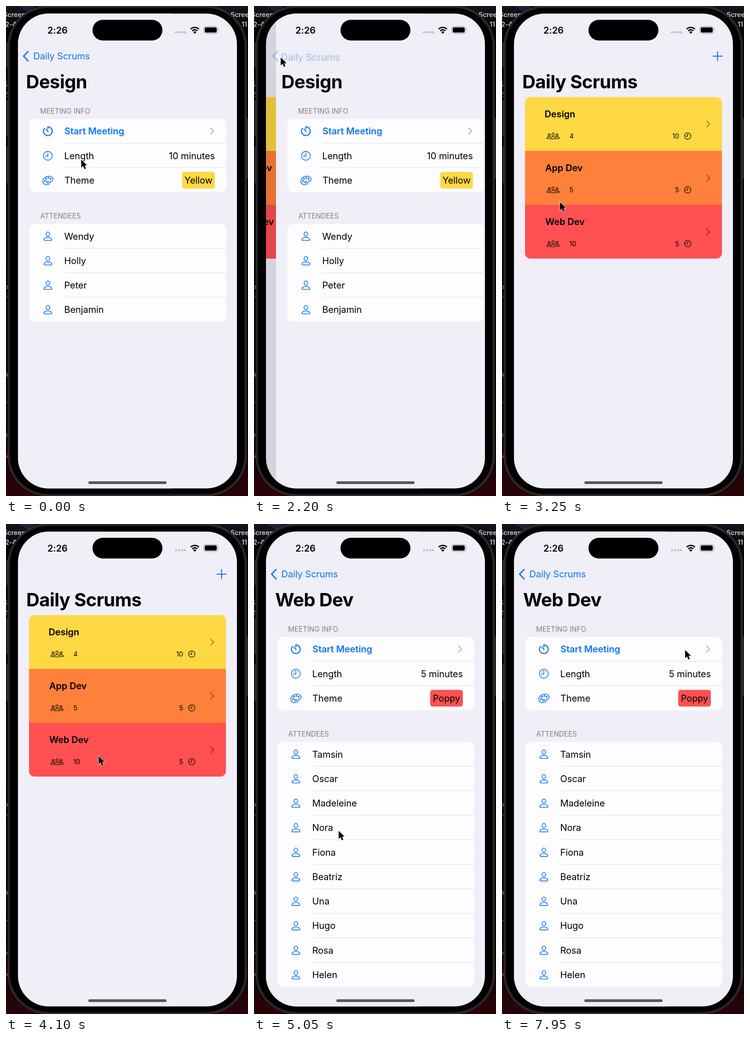
These frames come from a looping animation (526 by 1065 pixels, 8000 ms). An HTML page:

```html
<!DOCTYPE html>
<html lang="en">
<head>
<meta charset="utf-8">
<title>Daily Scrums</title>
<style>
@property --out { syntax: "<number>"; inherits: true; initial-value: 0; }
@property --in { syntax: "<number>"; inherits: true; initial-value: 0; }

html, body { margin: 0; width: 526px; height: 1065px; overflow: hidden; background: #000; }

svg {
  /* critically damped spring */
  --spring: linear(0, .0265 2.34%, .0902 4.68%, .2642 9.36%, .4422 14.04%, .594 18.73%,
    .7127 23.41%, .8009 28.09%, .8641 32.77%, .9084 37.45%, .9389 42.13%, .9596 46.8%,
    .9826 56.2%, .9927 65.5%, .997 74.9%, 1);
  /* 0 while a detail page is shown, 1 while the list is shown */
  --list: calc(var(--out) - var(--in));
  display: block;
  font: 20px Inter, "Liberation Sans", sans-serif;
  font-optical-sizing: none;
  letter-spacing: -.1px;
  animation: pop 8s infinite var(--spring), push 8s infinite var(--spring);
}
@keyframes pop { 0%, 27.284% { --out: 0; } 34.784%, 100% { --out: 1; } }
@keyframes push { 0%, 54% { --in: 0; } 61.5%, 100% { --in: 1; } }

.design { --gone: var(--out); }
.web { --gone: calc(1 - var(--in)); }
.page { transform: translateX(calc(476px * var(--gone))); }
.title { transform: translateX(calc(348px * var(--gone))); opacity: calc(1 - var(--gone)); }
.list { transform: translateX(calc(-143px * (1 - var(--list)))); }
.dim { opacity: calc(.12 * (1 - var(--list))); }

.fade-in { opacity: var(--list); }
.fade-out { opacity: calc(1 - var(--list)); }
.grow, .grow-label {
  --move: translate(calc(59.5px - 15.5px * var(--list)), calc(116px + 63.2px * var(--list)));
}
.grow { transform: var(--move) scale(calc(.482 + .518 * var(--list))); }
.grow-label { transform: var(--move) scale(calc(1 + 1.08 * var(--list))); }
.arrow { transform: translateX(calc(70px * var(--list))); }
.press { animation: press 8s infinite linear; }
@keyframes press { 0%, 26.2% { opacity: 1; } 26.8%, 40% { opacity: .3; } 40.1%, 100% { opacity: 1; } }

/* the pointer drifts steadily and rests only around its clicks */
.cursor { animation: roam 8s infinite cubic-bezier(.35, .15, .65, .85); }
@keyframes roam {
  0% { transform: translate(163.5px, 334px); }
  25%, 27.5% { transform: translate(58px, 111.5px); }
  32.5% { transform: translate(63px, 361.5px); }
  50%, 54% { transform: translate(201.5px, 504.5px); }
  63% { transform: translate(184px, 667.5px); }
  83% { transform: translate(182.5px, 493.5px); }
  99%, 100% { transform: translate(398px, 274px); }
}

.big { font-size: 40px; font-weight: 700; letter-spacing: -.6px; }
.bold { font-weight: 600; }
.head { font-size: 15.2px; fill: #7f7e84; letter-spacing: 0; }
.small { font-size: 14.4px; }
.end { text-anchor: end; }
.mid { text-anchor: middle; }
.blue { fill: #0a74ee; }
.icon { fill: none; stroke: #0a74ee; stroke-width: 1.6; stroke-linecap: round; stroke-linejoin: round; }
.ink { stroke: #1c1200; stroke-width: 1.3; }
.rule { stroke: #dcdbe0; }
</style>
</head>
<body>
<svg width="526" height="1065" viewBox="0 0 526 1065">
  <defs>
    <clipPath id="screen"><rect x="26" y="16.5" width="476" height="1032" rx="66.6"/></clipPath>
    <clipPath id="deck"><rect x="50" y="198" width="428" height="351" rx="12"/></clipPath>
    <linearGradient id="wall" x2="0" y2="1">
      <stop offset="0" stop-color="#17131d"/><stop offset=".06" stop-color="#050506"/>
      <stop offset=".85" stop-color="#050304"/><stop offset="1" stop-color="#2a0408"/>
    </linearGradient>
    <path id="timer" stroke-width="2.3" d="M0-5.5V-9.4A9.5 9.5 0 1 1-7.4-5.9M-4-4.6L.6.8"/>
    <g id="clock"><circle r="9.6"/><path d="M0-6.2V.6H-5"/></g>
    <g id="palette">
      <path d="M-11 2C-11-5-4-9.3 2-9.3S11.4-6 11.4-2.5 8 2 5.5 3.3 6 9.4-1 9.4-11 7-11 2Z"/>
      <circle cx="-6.3" cy="1.2" r="1.2"/><circle cx="-4.2" cy="-3.6" r="1.2"/>
      <circle cx="1" cy="-5.4" r="1.2"/><circle cx="6" cy="-3.6" r="1.2"/><circle cx="-.5" cy="4" r="2"/>
    </g>
    <g id="person">
      <ellipse cy="-4.6" rx="4" ry="4.6"/>
      <path d="M-6.3 9.2C-8 9.2-8.6 8.6-8.6 7.4-8.6 5 -5 2.6 0 2.6S8.6 5 8.6 7.4C8.6 8.6 8 9.2 6.3 9.2Z"/>
    </g>
    <g id="people">
      <ellipse cy="-3.4" rx="2.6" ry="3"/>
      <path d="M-5.2 6.2Q-6.4 6.2-6.2 5C-5.6 2.8-3 1.6 0 1.6S5.6 2.8 6.2 5Q6.4 6.2 5.2 6.2Z"/>
      <g id="side"><circle cx="-8.6" cy="-2.4" r="2.2"/>
        <path d="M-8.4 5.4H-12.6Q-13.6 5.4-13.4 4.2C-12.8 2.4-11 1.6-8.8 1.6Q-7 1.6-5.8 2.4"/></g>
      <use href="#side" transform="scale(-1 1)"/>
    </g>
    <path id="more" d="M-3.2-6.4L3.4 0-3.2 6.4" fill="none" stroke-width="2.3" stroke-linecap="round" stroke-linejoin="round"/>
  </defs>

  <rect width="526" height="1065" fill="url(#wall)"/>
  <path d="M28 0H62L50 14Z" fill="#2b1c36"/>
  <g class="small bold" fill="#c9c8cc">
    <text x="-6" y="24">Screen</text><text x="-2" y="45">2-4</text>
    <text x="488" y="24">Screen</text><text x="512" y="45">11</text>
  </g>
  <g class="small" fill="#8b8a8f">
    <text x="-6" y="176">S</text><text x="-5" y="197">2</text>
    <text x="-4" y="615">o</text><text x="-3" y="637">-</text>
    <text x="-5" y="806">A</text><text x="-3" y="866">-</text><text x="-5" y="937">e</text>
  </g>
  <path d="M0 982L4 977" stroke="#c0202a" stroke-width="3"/>
  <path d="M2.5 78V133M2.5 205V283M2.5 305V385M524 245V375" stroke="#2c2c2f" stroke-width="2.5"/>
  <rect x="4.8" y=".8" width="517.4" height="1063.4" rx="87" stroke="#434346" stroke-width="1.6"/>
  <rect x="7.2" y="3.2" width="512.6" height="1058.6" rx="84.6" fill="none" stroke="#1f1f21" stroke-width="3.2"/>

  <g clip-path="url(#screen)">
    <g class="list">
      <rect x="26" y="16" width="476" height="1033" fill="#f0eef7"/>
      <g id="cards" clip-path="url(#deck)"></g>
    </g>
    <rect class="dim" x="26" y="16" width="476" height="1033"/>
    <g id="design" class="design page"></g>
    <g id="web" class="web page"></g>

    <text class="design title big" x="43.6" y="179.2">Design</text>
    <text class="web title big" x="46" y="179.2">Web Dev</text>
    <g class="fade-in">
      <text class="grow big">Daily Scrums</text>
      <path class="icon" d="M458.5 109H478.5M468.5 99V119" style="stroke-width:2.1"/>
    </g>
    <g class="fade-out"><g class="press">
      <path class="icon arrow" d="M48 98.8L38.2 109 48 119.2" style="stroke-width:2.8"/>
      <text class="grow-label blue">Daily Scrums</text>
    </g></g>

    <text class="bold" x="90" y="59.6">2:26</text>
    <rect x="188" y="30" width="152" height="45" rx="22.5"/>
    <g fill="#b9b8be">
      <circle cx="369.5" cy="57" r="2.3"/><circle cx="376" cy="57" r="2.3"/>
      <circle cx="382.5" cy="57" r="2.3"/><circle cx="389" cy="57" r="2.3"/>
    </g>
    <path d="M401.3 50.2A13 13 0 0 1 419.3 50.2M404.6 54A8.3 8.3 0 0 1 416 54" fill="none" stroke="#000" stroke-width="2.8"/>
    <path d="M410.3 60.3L406.8 56.7Q410.3 53.9 413.8 56.7Z"/>
    <rect x="430" y="44.6" width="30" height="15.2" rx="5" fill="none" stroke="#a09fa5" stroke-width="1.3"/>
    <rect x="432" y="46.6" width="26" height="11.2" rx="3.2"/>
    <path d="M461.6 49.8Q464 52.2 461.6 54.6Z" fill="#a09fa5"/>
    <rect x="179" y="1033" width="170" height="6" rx="3" fill="#58575c"/>
  </g>

  <path class="cursor" d="M0 0V17.6L4.1 13.8 7 20.6 10.2 19.2 7.4 12.6H12.8Z" stroke="#fff" stroke-width="1.4" paint-order="stroke"/>
</svg>
<script>
const byId = id => document.getElementById(id);
const STEP = 53.27;

const icon = (name, x, y, cls = "") => `<use class="icon ${cls}" href="#${name}" x="${x}" y="${y}"/>`;
const label = (text, x, y, cls = "") => `<text class="${cls}" x="${x}" y="${y}">${text}</text>`;
const panel = (y, rows) => {
  let out = `<rect x="50.5" y="${y}" width="428" height="${rows * STEP - .7}" rx="12" fill="#fdfcff"/>`;
  for (let i = 1; i < rows; i++) {
    const line = y - .5 + i * STEP;
    out += `<path class="rule" d="M128 ${line}H478.5"/>`;
  }
  return out;
};

function detail(minutes, theme, color, names) {
  const people = names.map((name, i) => {
    const y = 500.3 + i * STEP;
    return icon("person", 91, y) + label(name, 126.5, y + 7.2);
  });
  return `<rect x="26" y="16" width="476" height="1033" fill="#f0eef7"/>`
    + label("MEETING INFO", 74, 234, "head") + panel(245.5, 3)
    + icon("timer", 91, 272) + label("Start Meeting", 127, 279, "blue bold")
    + `<use href="#more" x="448" y="271.8" stroke="#b9b8be"/>`
    + icon("clock", 91, 325.5) + label("Length", 126.5, 332.6)
    + label(`${minutes} minutes`, 454, 332.6, "end")
    + icon("palette", 91, 379) + label("Theme", 127, 385.9)
    + `<rect x="383" y="360.5" width="71" height="36.3" rx="5" fill="${color}"/>`
    + label(theme, 418.5, 385.9, "mid")
    + label("ATTENDEES", 74.5, 462, "head") + panel(473.7, names.length) + people.join("");
}

function card([name, people, minutes, color], i) {
  const y = 198 + i * 117;
  return `<rect x="50" y="${y}" width="428" height="117.5" fill="${color}"/>`
    + label(name, i ? 94 : 92.5, y + 44.4, "bold")
    + icon("people", 111, y + 84.6, "ink") + label(people, 146.5, y + 89.8, "small")
    + label(minutes, 385, y + 89.8, "small end")
    + `<use class="icon ink" href="#clock" transform="translate(403.7 ${y + 84.6}) scale(.73)" style="stroke-width:1.9"/>`
    + `<use href="#more" x="448.2" y="${y + 58.8}" stroke="#000" opacity=".34"/>`;
}

byId("cards").innerHTML = [
  ["Design", 4, 10, "#fed843"],
  ["App Dev", 5, 5, "#ff803a"],
  ["Web Dev", 10, 5, "#ff5052"],
].map(card).join("");

byId("design").innerHTML = detail(10, "Yellow", "#fed843", ["Wendy", "Holly", "Peter", "Benjamin"]);
byId("web").innerHTML = detail(5, "Poppy", "#ff5052",
  ["Tamsin", "Oscar", "Madeleine", "Nora", "Fiona", "Beatriz", "Una", "Hugo", "Rosa", "Helen"]);
</script>
</body>
</html>
```
